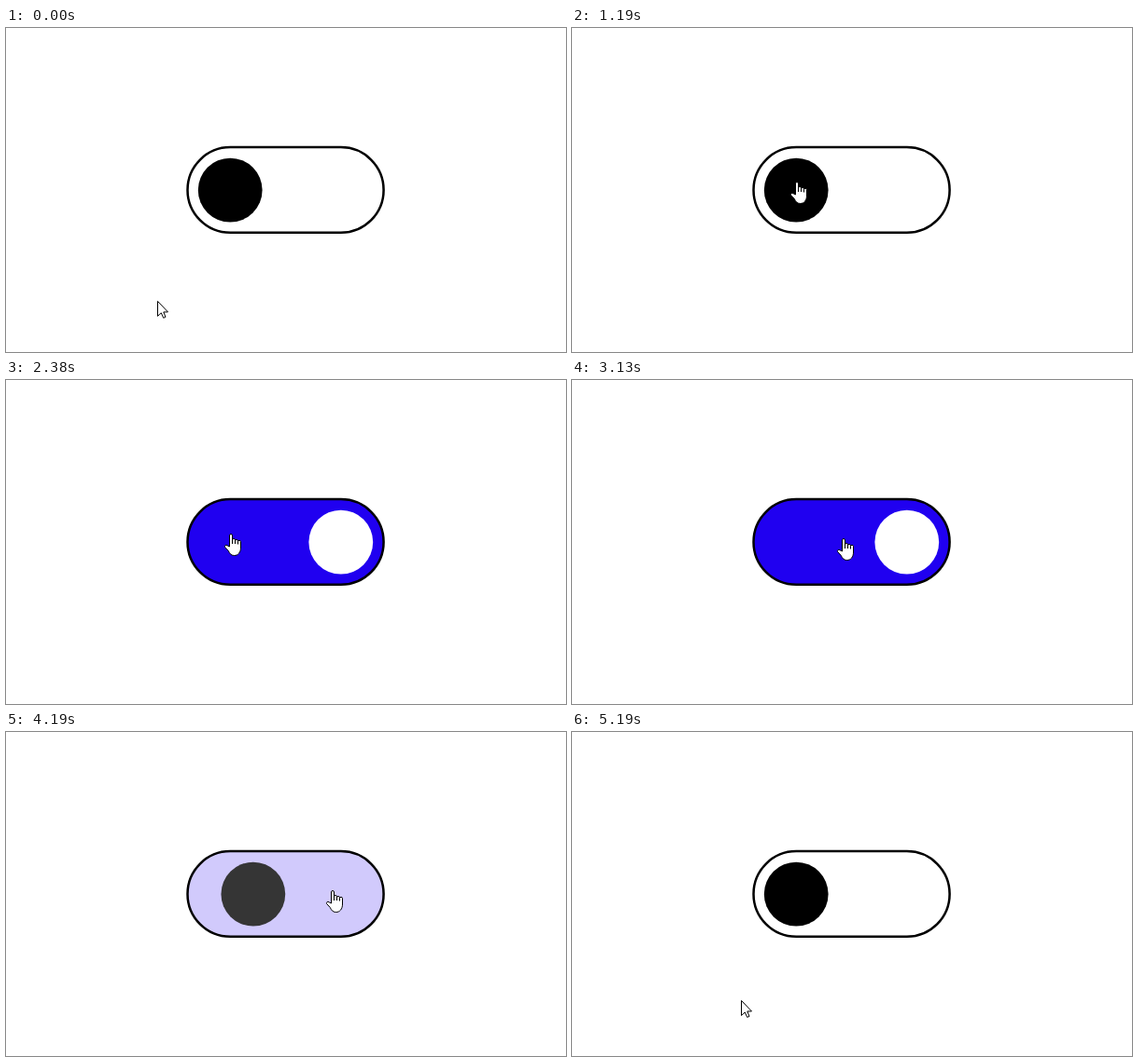
These frames come from a looping animation (600 by 348 pixels, 5.69 s). An HTML page:

```html
<!DOCTYPE html>
<html lang="en">
<head>
<meta charset="utf-8">
<title>Toggle switch</title>
<style>
  html, body { margin: 0; width: 100%; height: 100%; overflow: hidden; background: #fff; }
  svg { display: block; width: 100%; height: 100%; }
</style>
</head>
<body>
<svg viewBox="0 0 600 348">
  <rect id="track" x="194.5" y="128.1" width="210.1" height="91.6" rx="45.8" stroke="#000" stroke-width="2.5"/>
  <circle id="knob" cy="174.1" r="34.4"/>
  <g id="cursor" fill="#fff" stroke="#000" stroke-linejoin="round">
    <path id="arrow" d="M.5 .5V16.5L4.3 13L6.7 18.4L9 17.4L6.8 12H11.5Z"/>
    <g id="hand" transform="translate(-7 0)">
      <path d="M5.5 14V2a1.5 1.5 0 0 1 3 0V6.8a1.5 1.3 0 0 1 3 0V7.8a1.5 1.3 0 0 1 3 0V8.6a1.5 1.3 0 0 1 3 0V15c0 5-2.7 8.5-7 8.5c-3.6 0-5-2.4-6.2-5L.7 14.6c-.8-2 1.1-3 2.4-1.8Z"/>
      <path d="M8.5 6.5V11M11.5 7.5V11M14.5 8.5V11.5" fill="none"/>
    </g>
  </g>
</svg>
<script>
  const LOOP = 5690;
  const STEP = 62.5;
  const FADE = 200;
  const WHITE = [255, 255, 255], BLACK = [0, 0, 0], BLUE = [32, 0, 240];

  const [track, knob, cursor, arrow, hand] =
    ["track", "knob", "cursor", "arrow", "hand"].map(id => document.getElementById(id));

  // Each cursor move follows one cubic curve: x and y hold its four control points.
  const moves = [
    { at: 440, steps: 13, x: [162, 185, 218, 241], y: [293, 265, 172, 165] },
    { at: 2810, steps: 13, x: [241, 300, 290, 350], y: [165, 170, 174, 170] },
    { at: 4690, steps: 9, x: [350, 362, 260, 181], y: [170, 215, 285, 288] }
  ];

  const clamp = (v, lo, hi) => Math.min(hi, Math.max(lo, v));
  const lerp = (a, b, p) => a + (b - a) * p;
  const mix = (from, to, p) => `rgb(${from.map((v, i) => Math.round(lerp(v, to[i], p)))})`;
  const smooth = p => p * p * (3 - 2 * p);

  function bezier([a, b, c, d], s) {
    const r = 1 - s;
    return a * r ** 3 + 3 * b * s * r * r + 3 * c * s * s * r + d * s ** 3;
  }

  // The CSS "ease" curve, cubic-bezier(.25, .1, .25, 1).
  function ease(p) {
    let lo = 0, hi = 1;
    for (let i = 0; i < 20; i++) {
      const mid = (lo + hi) / 2;
      if (bezier([0, .25, .25, 1], mid) < p) lo = mid; else hi = mid;
    }
    return bezier([0, .1, 1, 1], hi);
  }

  // Progress of a switch whose first visible step falls at time `at`.
  function flip(t, at) {
    if (t < at) return 0;
    const shown = Math.floor((t - at) / 60) * 60 + 38;
    return ease(clamp(shown / FADE, 0, 1));
  }

  function cursorAt(t) {
    const { at, steps, x, y } = moves.filter(m => t >= m.at).pop() || moves[0];
    const step = Math.floor((t - at) / STEP) + 1;
    const s = smooth(clamp(step / steps, 0, 1));
    return [x, y].map(c => Math.round(bezier(c, s)));
  }

  function overTrack(x, y) {
    return Math.hypot(x - clamp(x, 240, 359), y - 174) < 47;
  }

  function draw(t) {
    const on = flip(t, 2190) - flip(t, 4130);
    track.setAttribute("fill", mix(WHITE, BLUE, on));
    knob.setAttribute("fill", mix(BLACK, WHITE, on));
    knob.setAttribute("cx", lerp(240.2, 358.8, on));

    const [x, y] = cursorAt(t);
    const over = overTrack(x, y);
    cursor.setAttribute("transform", `translate(${x} ${y})`);
    hand.style.display = over ? "" : "none";
    arrow.style.display = over ? "none" : "";
  }

  const start = performance.now();
  function tick() {
    draw((performance.now() - start) % LOOP);
    requestAnimationFrame(tick);
  }
  tick();
</script>
</body>
</html>
```
